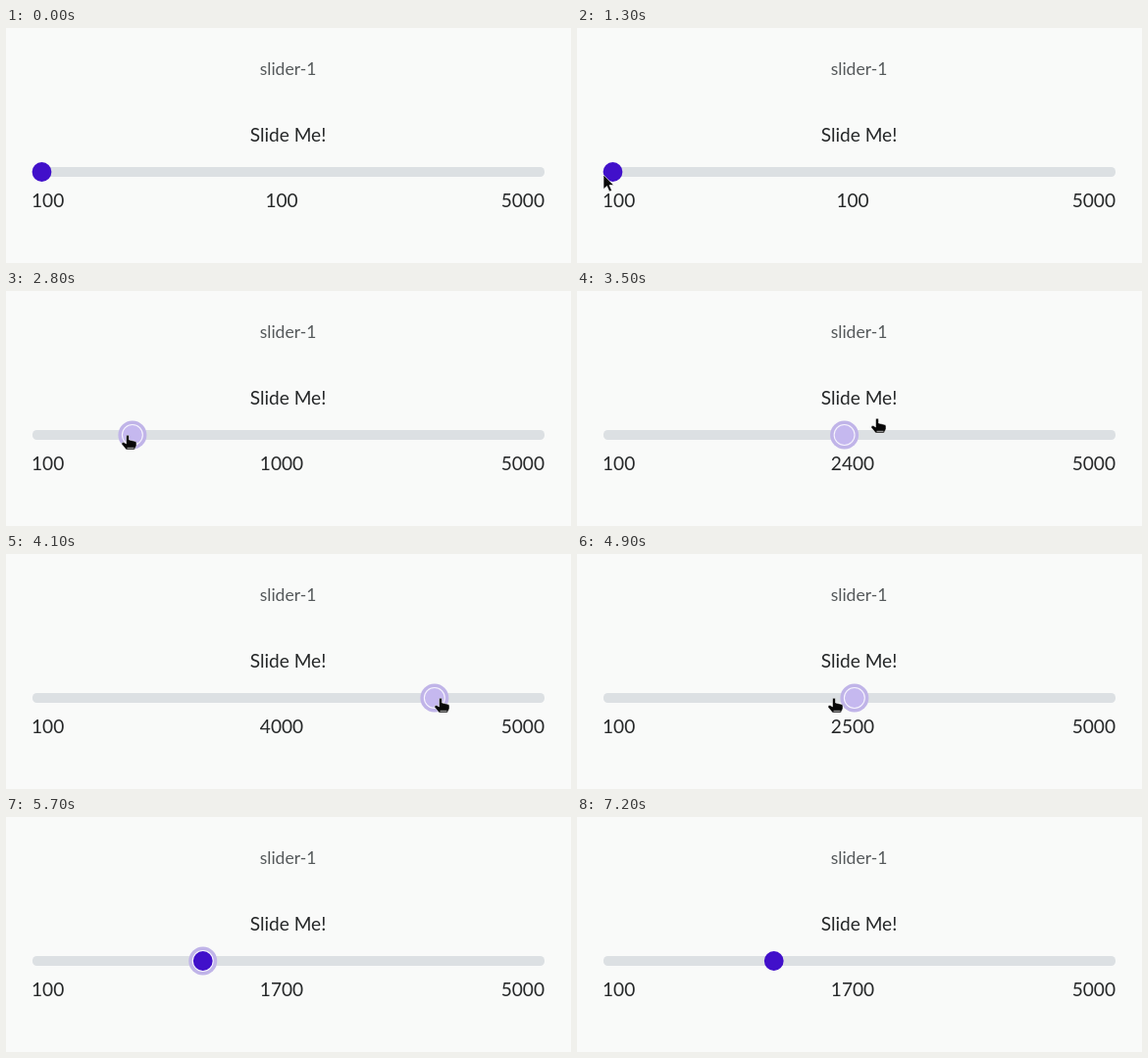
An HTML page for the animation above (8.4 s loop, 576 px wide and 240 px high).

```html
<!DOCTYPE html>
<html lang="en">
<head>
<meta charset="utf-8">
<title>Slider</title>
<style>
  html, body { margin: 0; height: 100%; overflow: hidden; background: #f9faf9; }
  svg { display: block; width: 576px; height: 240px; }
  text { font: 19.1px Lato, sans-serif; fill: #262829; }
  .title { font-size: 17.5px; fill: #55595b; }
  .mid { text-anchor: middle; }
  .end { text-anchor: end; }
</style>
</head>
<body>
<svg viewBox="0 0 576 240">
  <text class="title mid" x="287.5" y="48">slider-1</text>
  <text class="mid" x="287.5" y="116">Slide Me!</text>
  <rect x="27" y="142" width="522" height="10" rx="4.5" fill="#dce0e3"/>
  <text x="26" y="183">100</text>
  <text class="mid" id="value" x="281" y="183">100</text>
  <text class="end" x="549" y="183">5000</text>
  <g id="thumb">
    <g id="halo">
      <circle r="14.5" fill="#c0b4e8"/>
      <circle r="11" fill="#f6f4fd"/>
    </g>
    <circle id="knob" r="9.9"/>
  </g>
  <g id="cursor">
    <path id="arrow" d="M0 0V14.5L3.5 11.5 6 17 8.5 16 6 10.5H10.5Z" fill="#080808" stroke="#fff" stroke-width=".6"/>
    <g id="hand">
      <path d="M-1.5 1Q0 -1 1.5 1V5L8 6.5Q9 7 9 8.5V11L7 15H-1.5L-6 9.5Q-6.5 7 -4 7.5L-1.5 9Z" fill="#080808" stroke="#fff" stroke-width=".5"/>
      <path d="M-.5 13.3H6.5" stroke="#ddd" stroke-width=".8"/>
    </g>
  </g>
</svg>
<script>
const LOOP = 8400, STEP = 100;
const $ = id => document.getElementById(id);
const mix = (a, b, p) => a + (b - a) * p;
const easeOut = (u, power) => 1 - (1 - u) ** power;

// Each gesture takes the pointer and the slider value to a new resting state.
const idle = { x: 290, y: 215, value: 100 };
const gestures = [
  { start: 780, duration: 520, x: 27, y: 150, value: 100 },
  { start: 1300, duration: 300, x: 42, y: 147, value: 100 },
  { start: 2120, duration: 900, x: 125, y: 147, value: 1000 },
  { start: 3280, duration: 900, x: 443, y: 147, value: 4000, lift: 17 },
  { start: 4555, duration: 900, x: 207, y: 147, value: 1700 },
  { start: 5460, duration: 200, x: 213, y: 166, value: 1700 }
];

// The value trails the pointer, so it eases out more gently.
function follow(from, to, t) {
  const u = Math.min(1, Math.max(0, (t - to.start) / to.duration));
  const p = easeOut(u, 3);
  return {
    x: mix(from.x, to.x, p),
    y: mix(from.y, to.y, p) - (to.lift || 0) * 4 * p * (1 - p),
    value: mix(from.value, to.value, easeOut(u, 2.2))
  };
}

const place = (id, x, y) => $(id).setAttribute("transform", `translate(${x} ${y})`);
const show = (id, opacity) => $(id).setAttribute("opacity", Number(opacity));

function draw(now) {
  const t = Math.floor(now % LOOP / STEP) * STEP;
  const state = gestures.reduce((from, to) => follow(from, to, t), idle);
  const value = Math.round(state.value / 100) * 100;
  const pressed = t >= 2100 && t < 5500;
  const pointing = t >= 1500 && t < 5600;

  $("value").textContent = value;
  place("thumb", mix(36.5, 539.5, (value - 100) / 4900), 147);
  $("knob").setAttribute("fill", pressed ? "#c5b8ef" : "#4110ca");
  show("halo", t < 2100 || t >= 7200 ? 0 : t >= 7100 ? 0.5 : 1);

  place("cursor", Math.round(state.x), Math.round(state.y));
  show("cursor", t >= 800 && t < 5700);
  show("hand", pointing);
  show("arrow", !pointing);
}

const start = performance.now();
function tick() {
  draw(performance.now() - start);
  requestAnimationFrame(tick);
}
tick();
</script>
</body>
</html>
```
